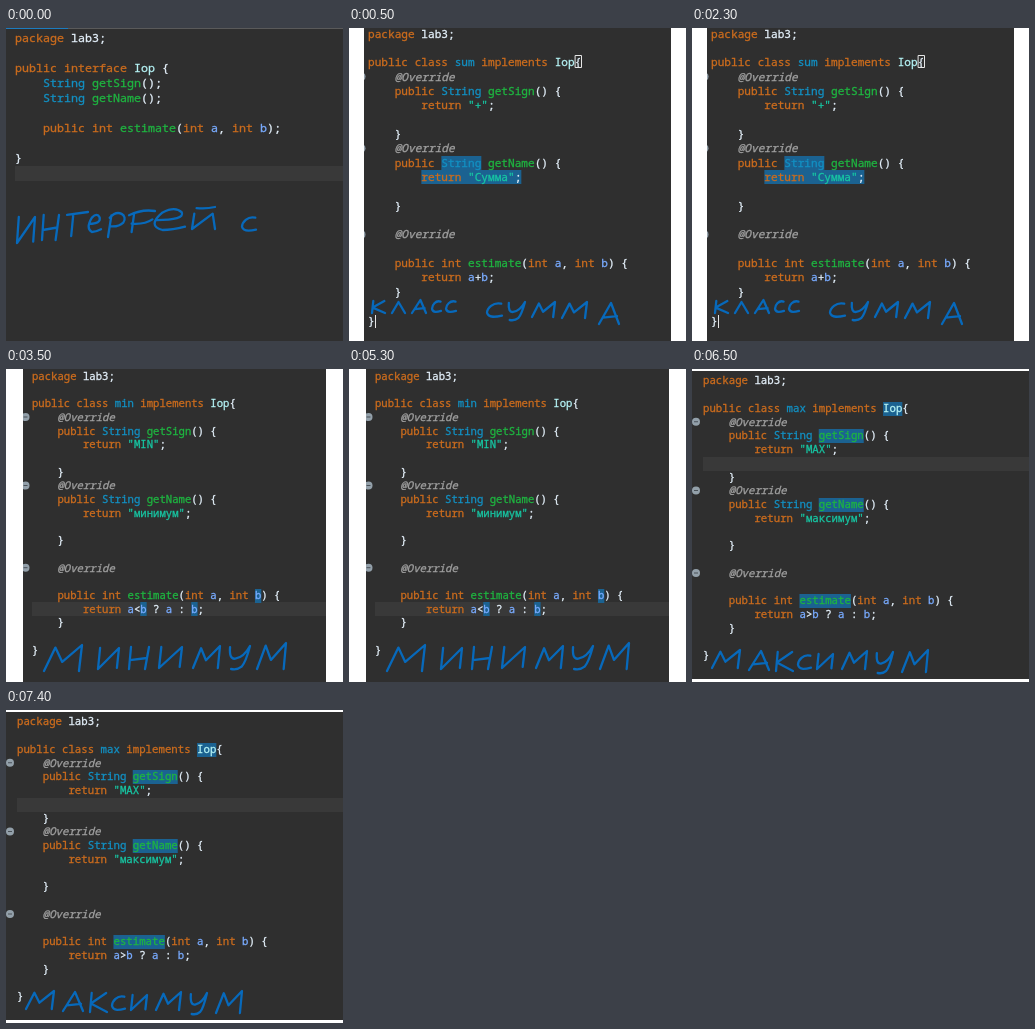
An HTML page with a canvas that plays this animation: 337x313 px, repeating every 8000 ms.

```html
<!DOCTYPE html>
<html lang="ru">
<head>
<meta charset="utf-8">
<style>
html, body { margin: 0; width: 100%; height: 100%; overflow: hidden; background: #fff; }
canvas { display: block; }
</style>
</head>
<body>
<canvas width="337" height="313"></canvas>
<script>
const ctx = document.querySelector('canvas').getContext('2d');

const rules = [
  [/^@\w+/, '#a0a0a0'],
  [/^"[^"]*"/, '#17c6a3'],
  [/^(package|public|interface|class|implements|int|return)\b/, '#cc6c1d'],
  [/^(String|sum|min|max)\b/, '#1290c3'],
  [/^\w+(?=\()/, '#1eb540'],
  [/^[ab]\b/, '#79abff'],
  [/^Iop\b/, '#b4f2f4'],
  [/^(\w+|\s+|.)/, '#e4f0fa']
];

// Handwritten letters in a 10 x 10 box
const letters = {
  И: 'M1 0L0 10L10 0L9 9.5',
  Й: 'M1 3L0 10L9 3L10 10M2 .5Q6 1 10 0',
  Н: 'M1 0L0 10M.5 6L9 5M10 0L8 10',
  Г: 'M3 1L2 10M0 1.2L10 0',
  Е: 'M1 5.5Q10 5.5 9 2Q7 -1 3 2Q-2 8 3 10Q6 10 10 8.5',
  Р: 'M2 1L0 10M1 2C6 -2 12 1 9 4Q6 6 1 5.5',
  Ф: 'M2 1L1 10M0 2Q5 -1 10 0M1 6Q6 6.5 9 4',
  С: 'M9.5 .5C4 -1 0 4 0 7C1 11 6 10 10 9',
  К: 'M1 0L0 10M9.5 0L.5 5.5L10 10',
  Л: 'M0 10L5 0L10 10',
  А: 'M0 10L6 0L10 10M2 7L9 6.3',
  М: 'M0 10L3 1L4.8 6.5L10 0L9.2 10',
  У: 'M.5 .5Q0 6 3 5.5Q7 5 10 0Q8 7 6 9Q4 10.5 1 10'
};

const classCode = (name, sign, label, result) => `package lab3;

public class ${name} implements Iop{
    @Override
    public String getSign() {
        return "${sign}";

    }
    @Override
    public String getName() {
        return "${label}";

    }

    @Override

    public int estimate(int a, int b) {
        return ${result};
    }

}`;

// x, y: centre of the first character row; marks: [row, column, length]; ink: letter x y w h
const scenes = [
  {
    start: 0, left: 0, right: 337, top: 0, bottom: 313, x: 9, y: 10, adv: 7, row: 15, current: 9, marks: [],
    code: `package lab3;

public interface Iop {
    String getSign();
    String getName();

    public int estimate(int a, int b);

}`,
    ink: 'И 11 189 18 26,Н 36 187 17 25,Г 61 184 21 24,Е 82 186 13 18,Р 102 185 17 24,Ф 123 183 26 21,Е 147 180 32 22,Й 186 179 23 22,С 236 189 14 14',
    extra() {
      box('#5a5a5a', 0, 0, 337, 1);
      box('#1c7cc0', 0, 0, 62, 1);
    }
  },
  {
    start: 500, left: 15, right: 322, top: 0, bottom: 313, x: 19, y: 6, adv: 6.667, row: 14.35, fold: 12.5,
    marks: [[9, 11, 6], [10, 8, 15]],
    code: classCode('sum', '+', 'Сумма', 'a+b'),
    ink: 'К 23 273 13 12,Л 43 274 13 11,А 63 272 14 13,С 83 273 9 11,С 97 273 10 11,С 138 275 15 14,У 159 274 17 18,М 183 274 23 15,М 213 274 25 16,А 250 275 20 21',
    extra() {
      ctx.strokeStyle = '#e6e6e6';
      ctx.lineWidth = 1;
      ctx.strokeRect(226.5, 27.5, 6, 12);
      box('#e6e6e6', 26, 287, 1, 13);
    }
  },
  {
    start: 3500, left: 17, right: 320, top: 0, bottom: 313, x: 26, y: 7.4, adv: 6.37, row: 13.7, current: 17, fold: 19.5,
    marks: [[16, 35, 1], [17, 17, 1], [17, 25, 1]],
    code: classCode('min', 'MIN', 'минимум', 'a<b ? a : b'),
    ink: 'М 38 276 38 26,И 92 279 21 21,Н 123 278 20 22,И 153 278 23 21,М 187 277 27 22,У 223 277 21 23,М 251 274 29 26'
  },
  {
    start: 6500, left: 0, right: 337, top: 2, bottom: 310, x: 11, y: 12, adv: 6.43, row: 13.75, current: 6, fold: 4,
    marks: [[2, 28, 3], [4, 18, 7], [9, 18, 7], [16, 15, 8]],
    code: classCode('max', 'MAX', 'максимум', 'a>b ? a : b'),
    ink: 'М 20 281 28 18,А 57 282 20 19,К 84 283 17 19,С 106 286 13 14,И 125 285 16 15,М 150 282 25 18,У 184 283 17 21,М 210 281 26 22'
  }
];

function box(color, x, y, w, h) {
  ctx.fillStyle = color;
  ctx.fillRect(x, y, w, h);
}

function drawLine(line, { x, adv }, y) {
  let col = 0;
  ctx.lineWidth = 0.3;
  while (line) {
    const [pattern, color] = rules.find(([re]) => re.test(line));
    const token = line.match(pattern)[0];
    ctx.font = `${token[0] === '@' ? 'italic ' : ''}${adv / 0.6}px "Noto Sans Mono", monospace`;
    ctx.fillStyle = ctx.strokeStyle = color;
    for (const ch of token) {
      const left = x + adv * col++;
      ctx.fillText(ch, left, y);
      ctx.strokeText(ch, left, y);
    }
    line = line.slice(token.length);
  }
}

function drawFold(x, y) {
  ctx.fillStyle = '#93a0aa';
  ctx.beginPath();
  ctx.arc(x, y, 4, 0, 7);
  ctx.fill();
  box('#4a5259', x - 2, y - 0.5, 4, 1);
}

function drawInk(ink) {
  ctx.strokeStyle = '#0769bb';
  ctx.lineWidth = 2.3;
  ctx.lineCap = ctx.lineJoin = 'round';
  for (const item of ink.split(',')) {
    const [letter, x, y, w, h] = item.split(' ');
    const path = new Path2D();
    path.addPath(new Path2D(letters[letter]), new DOMMatrix([w / 10, 0, 0, h / 10, +x, +y]));
    ctx.stroke(path);
  }
}

function drawScene(s) {
  const rowTop = row => Math.round(s.y + (row - 0.5) * s.row);
  box('#fff', 0, 0, 337, 313);
  ctx.save();
  ctx.beginPath();
  ctx.rect(s.left, s.top, s.right - s.left, s.bottom - s.top);
  ctx.clip();
  box('#2f2f2f', 0, 0, 337, 313);
  if (s.current) box('#393939', s.x, rowTop(s.current), 337, Math.round(s.row));
  for (const [row, col, len] of s.marks) {
    box('#1b6291', s.x + col * s.adv, rowTop(row), len * s.adv, Math.round(s.row));
  }
  s.code.split('\n').forEach((line, i) => {
    const y = s.y + i * s.row;
    drawLine(line, s, Math.round(y + s.adv * 0.53));
    if (s.fold && line.includes('@')) drawFold(s.fold, y - 0.5);
  });
  drawInk(s.ink);
  s.extra?.();
  ctx.restore();
}

let shown;
function tick() {
  const time = performance.now() % 8000;
  const scene = scenes.findLast(s => s.start <= time);
  if (scene !== shown) drawScene(shown = scene);
  requestAnimationFrame(tick);
}
tick();
</script>
</body>
</html>
```
